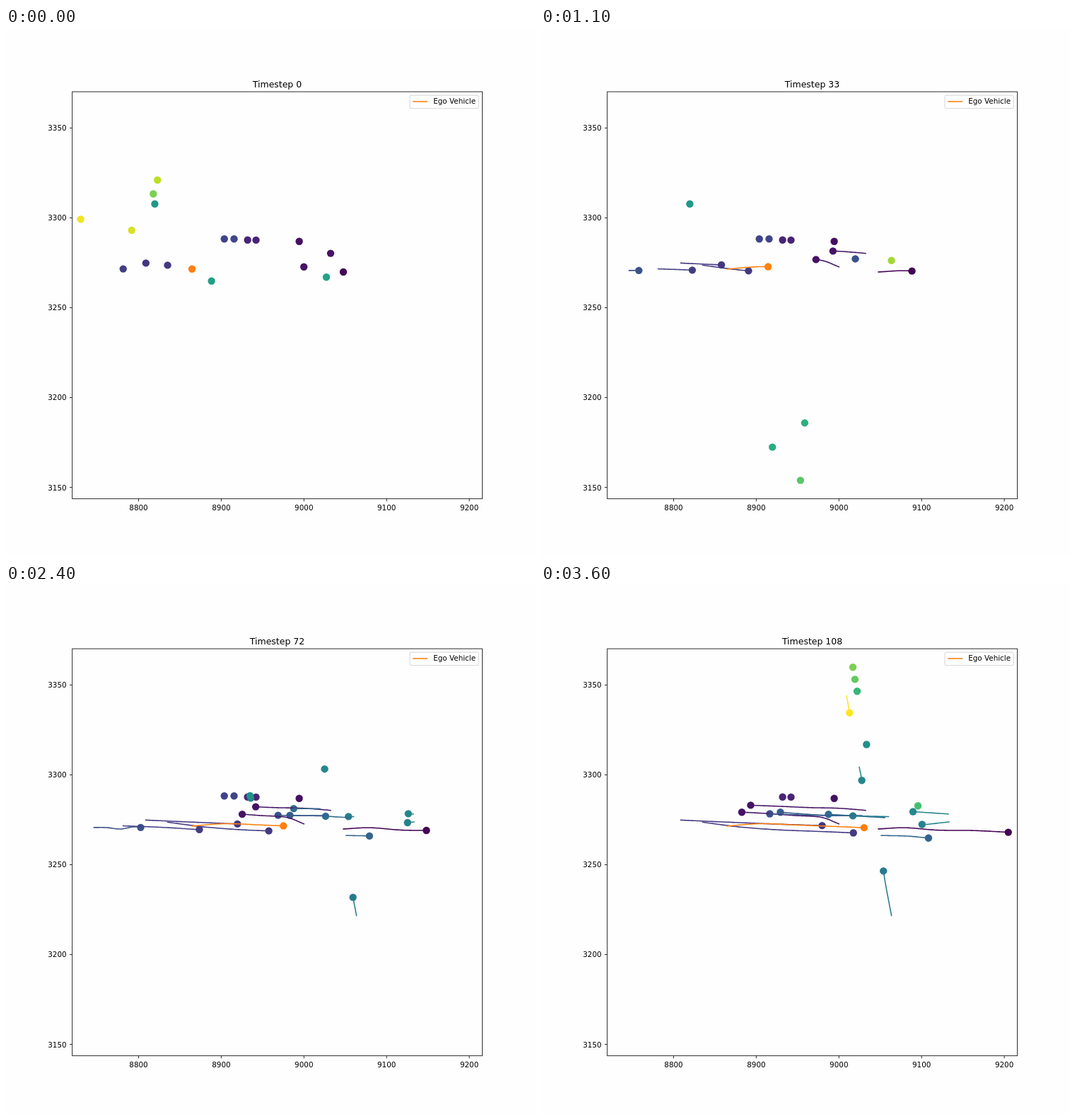
Animation, 748 px wide and 748 px high, one loop 3700 ms. Source, as an HTML page:

```html
<!DOCTYPE html>
<html lang="en">
<head>
<meta charset="utf-8">
<title>Vehicle tracks</title>
<style>
  html, body { margin: 0; width: 100%; height: 100%; overflow: hidden; background: #fefefe; }
  svg { display: block; width: 748px; height: 748px; font: 10.39px "DejaVu Sans", sans-serif; }
  #title { font-size: 12.47px; }
  .mid { text-anchor: middle; }
  .end { text-anchor: end; }
  .axis { fill: none; stroke: #000; stroke-width: .83; }
  #trails { fill: none; stroke-width: 1.56; stroke-linecap: square; stroke-linejoin: round; }
</style>
</head>
<body>
<svg viewBox="0 0 748 748">
  <g id="dots"></g>
  <g id="trails"></g>
  <g id="ticks"></g>
  <rect class="axis" x="93.7" y="90.1" width="579.7" height="575.6"/>
  <text id="title" class="mid" x="383.5" y="83.6"></text>
  <rect x="571" y="95.2" width="97.2" height="18.5" rx="2" fill="#fff" stroke="#ccc" stroke-opacity=".8"/>
  <path d="M575.2 104H596" stroke="#ff7f0e" stroke-width="1.56"/>
  <text x="604.2" y="107.4">Ego Vehicle</text>
</svg>
<script>
const $ = id => document.getElementById(id);
const FRAMES = 37, FRAME_MS = 100, STEP = 3, LAST = FRAMES - 1;
const VIRIDIS = '440154 482475 414487 355f8d 2a788e 21918c 22a884 44bf70 7ad151 bddf26 fde725'.split(' ');
const cars = [];

// Viridis colour at 0 to 100 percent
function viridis(percent) {
  const i = Math.min(Math.floor(percent / 10), 9), u = percent / 10 - i;
  const rgb = [0, 2, 4].map(c => {
    const [a, b] = [VIRIDIS[i], VIRIDIS[i + 1]].map(hex => parseInt(hex.slice(c, c + 2), 16));
    return Math.round(a + (b - a) * u);
  });
  return `rgb(${rgb})`;
}

// Points are evenly spaced in time; a single point is a parked car.
function car(shade, from, to, ...points) {
  cars.push({ color: shade === 'ego' ? '#ff7f0e' : viridis(shade), from, to, points });
}

// Cars that stay for the whole loop
car(0, 0, LAST, [477, 345], [515, 343.2], [560.5, 346.6], [611.5, 347.2], [660.7, 349.6]);
car(5, 0, LAST, [459, 318.6], [421.5, 315.7], [381.5, 314.8], [338.8, 313], [296.5, 311.4]);
car(5, 0, LAST, [421.2, 337.7], [396, 328.4], [360.2, 326], [321, 323.2], [284, 321.2]);
car(17, 0, LAST, [228.5, 335.4], [281.5, 342.2], [335.5, 346.2], [389.4, 348.3], [441.7, 350.5]);
car(16, 0, LAST, [197.8, 332.4], [244.5, 334.5], [293, 336.5], [344.7, 338.5], [397.5, 340.1]);
car(4, 0, LAST, [414.6, 301.7]);
car(10, 0, LAST, [341.6, 299.7]);
car(10, 0, LAST, [353.5, 299.9]);

// Cars that leave
car(18, 0, 32, [165.7, 340.6], [200.6, 341.8], [236.4, 343.5], [273.4, 345.8], [309, 346]);
car(20, 0, 33, [308.7, 298.3]);
car(21, 0, 28, [322.5, 298.2]);
car(98, 0, 2, [105.6, 270.4]);
car(94, 0, 2, [177.7, 286]);
car(90, 0, 2, [214.2, 215]);
car(80, 0, 3, [208.3, 234.5]);
car(53, 0, 13, [210.4, 248.7]);
car(56, 0, 9, [290.6, 357.8]);
car(58, 0, 9, [453, 352.2], [469, 353.4]);

// Cars that arrive later
car(25, 7, 32, [124.5, 342.9], [142, 343], [162, 345], [182.5, 341.9], [202.5, 345.2], [224.3, 346.6]);
car(75, 5, 9, [487, 317.4], [479, 319]);
car(87, 6, 8, [324.3, 398.2]);
car(63, 5, 14, [372.9, 557.6], [372.9, 558.7]);
car(62, 5, 14, [327.2, 592], [327.2, 593]);
car(74, 7, 14, [366.9, 639.1], [366.9, 640]);
car(86, 10, 12, [495.5, 328.7]);
car(25, 10, LAST, [449, 326.5], [389.6, 325.7], [323.5, 323.5]);
car(30, 13, LAST, [454, 326], [399, 325.5], [338.5, 321.3]);
car(32, 14, LAST, [481, 354.2], [517, 355], [547.9, 357.8]);
car(35, 16, 33, [444, 316.4], [365, 315.8]);
car(36, 15, LAST, [486, 329], [406.5, 324.2]);
car(71, 15, 19, [513, 328.8], [500, 328.6]);
car(45, 15, 28, [346, 301.4]);
car(83, 15, 19, [345.1, 296.6]);
car(50, 21, 28, [345.1, 298]);
car(41, 19, LAST, [495.6, 467.5], [487.7, 426], [484.2, 404.4]);
car(42, 22, LAST, [491.5, 327.5], [441, 326.4]);
car(44, 22, LAST, [577, 335], [547, 338.3], [538.8, 338.5]);
car(46, 22, LAST, [576, 323.8], [526, 320.5]);
car(46, 23, LAST, [450, 257.5], [453.4, 274], [453.6, 276.3]);
car(49, 28, LAST, [460.3, 225.5]);
car(58, 29, 33, [502.3, 463.4]);
car(66, 29, 33, [467, 189.5]);
car(66, 30, LAST, [447, 150.2]);
car(70, 30, LAST, [530.6, 313], [533, 312.3]);
car(76, 30, LAST, [443.9, 135.7], [443.9, 133.4]);
car(80, 30, LAST, [440.1, 115.6], [441, 116.3]);
car(100, 33, LAST, [432.2, 157], [436.3, 180.7]);
car('ego', 0, LAST, [263, 340.8], [310.3, 337.5], [359.5, 339.3], [408.6, 341.2], [456.8, 343.1]);

// Smooth curve through the points
function place({ from, to, points }, frame) {
  const last = points.length - 1;
  if (!last) return points[0];
  const s = (frame - from) / (to - from) * last;
  const i = Math.min(Math.floor(s), last - 1), u = s - i;
  const slope = (k, d) => {
    const before = Math.max(k - 1, 0), after = Math.min(k + 1, last);
    return (points[after][d] - points[before][d]) / (after - before);
  };
  return [0, 1].map(d => {
    const a = points[i][d], rise = points[i + 1][d] - a, m = slope(i, d), n = slope(i + 1, d);
    return a + u * (m + u * (3 * rise - 2 * m - n + u * (m + n - 2 * rise)));
  });
}

function draw(frame) {
  let dots = '', trails = '';
  for (const c of cars) {
    if (frame < c.from || frame > c.to) continue;
    const [x, y] = place(c, frame);
    dots += `<circle cx="${x}" cy="${y}" r="5.2" fill="${c.color}"/>`;
    const path = [];
    for (let f = c.from; f <= frame; f += .5) path.push(place(c, f));
    if (path.length > 1 && c.points.length > 1)
      trails += `<polyline points="${path.join(' ')}" stroke="${c.color}"/>`;
  }
  $('dots').innerHTML = dots;
  $('trails').innerHTML = trails;
  $('title').textContent = 'Timestep ' + frame * STEP;
}

let ticks = '';
for (let i = 0; i < 5; i++) {
  const x = 187.5 + i * 116.9, y = 141.4 + i * 127.05;
  ticks += `<path class="axis" d="M${x} 665.8v3.6M93.6 ${y}h-3.6"/>
    <text class="mid" x="${x}" y="681.7">${8800 + i * 100}</text>
    <text class="end" x="85.6" y="${y + 3.9}">${3350 - i * 50}</text>`;
}
$('ticks').innerHTML = ticks;

let shown = -1;
function tick() {
  const frame = Math.floor(performance.now() / FRAME_MS) % FRAMES;
  if (frame !== shown) draw(shown = frame);
  requestAnimationFrame(tick);
}
tick();
</script>
</body>
</html>
```
